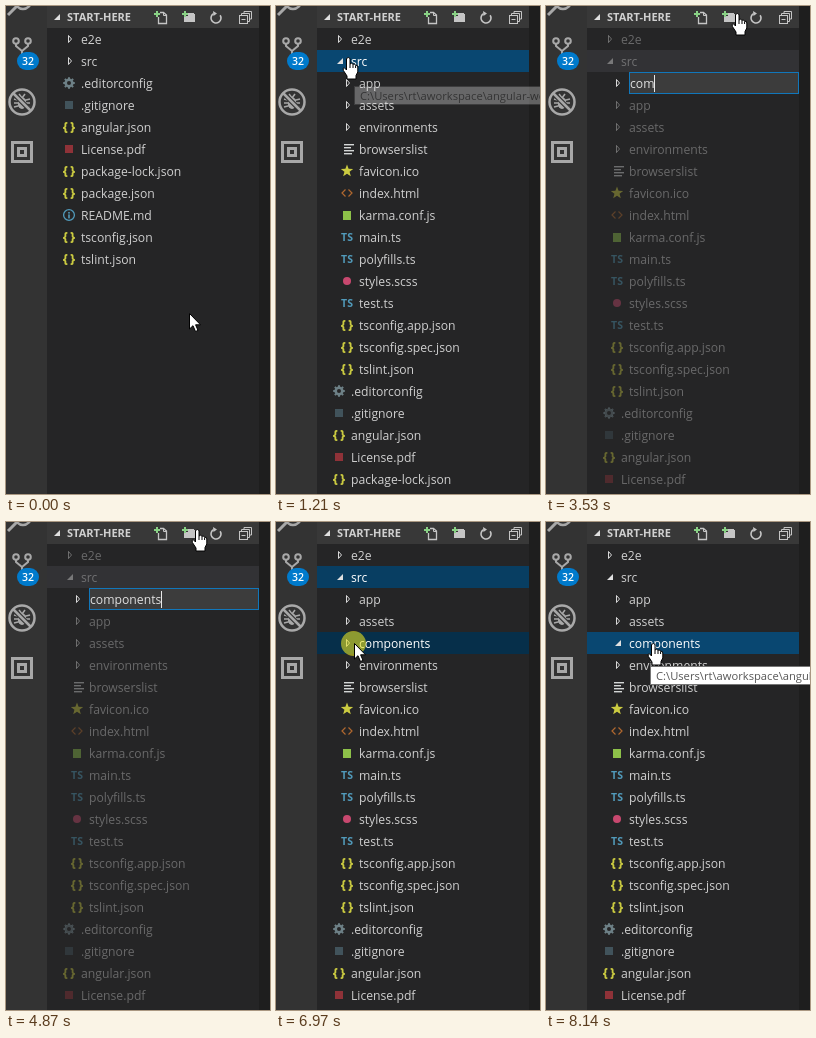
Recreate the animation shown at these times as an HTML page with a canvas. Size 264x488 px, loop 8210 ms.

```html
<!DOCTYPE html>
<html lang="en">
<head>
<meta charset="utf-8">
<title>Creating a folder in the file tree</title>
<style>
  html, body { margin: 0; width: 100%; height: 100%; overflow: hidden; background: #1e1e1e; }
  canvas { display: block; }
</style>
</head>
<body>
<canvas id="stage" width="264" height="488"></canvas>
<script>
const ctx = document.getElementById('stage').getContext('2d');
const LOOP = 8210;
const SANS = '"Open Sans", "Noto Sans", sans-serif';
const LABEL_FONT = '12.2px ' + SANS;
const TOOLTIP = 'C:\\Users\\rt\\aworkspace\\angular-workspace\\src';
const LEFT = 41, RIGHT = 253, ROW = 22;
const SELECTED = '#094771', SELECTED_DIM = '#083e62', FOCUSED = '#062f4a';

// name:icon
const parse = list => list.split(' ').map(s => s.split(':'));
const srcFiles = parse('app:dir assets:dir environments:dir browserslist:lines favicon.ico:star ' +
  'index.html:html karma.conf.js:green main.ts:ts polyfills.ts:ts styles.scss:pink test.ts:ts ' +
  'tsconfig.app.json:json tsconfig.spec.json:json tslint.json:json');
const rootFiles = parse('.editorconfig:gear .gitignore:slate angular.json:json License.pdf:red ' +
  'package-lock.json:json package.json:json README.md:info tsconfig.json:json tslint.json:json');

function path(points, close) {
  ctx.beginPath();
  for (let i = 0; i < points.length; i += 2) ctx.lineTo(points[i], points[i + 1]);
  if (close) ctx.closePath();
}
function line(points, color, width = 1) {
  path(points);
  ctx.strokeStyle = color;
  ctx.lineWidth = width;
  ctx.stroke();
}
function poly(points, color) {
  path(points, true);
  ctx.fillStyle = color;
  ctx.fill();
}
function box(x, y, w, h, color) {
  ctx.fillStyle = color;
  ctx.fillRect(x, y, w, h);
}
function frame(x, y, w, h, color, width = 1) {
  ctx.strokeStyle = color;
  ctx.lineWidth = width;
  ctx.strokeRect(x, y, w, h);
}
function disc(x, y, r, color) {
  ctx.beginPath();
  ctx.arc(x, y, r, 0, Math.PI * 2);
  ctx.fillStyle = color;
  ctx.fill();
}
function ring(x, y, r, color, width = 1, from = 0, to = Math.PI * 2) {
  ctx.beginPath();
  ctx.arc(x, y, r, from, to);
  ctx.strokeStyle = color;
  ctx.lineWidth = width;
  ctx.stroke();
}
function text(str, x, y, font, color, align = 'left') {
  ctx.font = font;
  ctx.fillStyle = color;
  ctx.textAlign = align;
  ctx.fillText(str, x, y);
}

function twistie(x, y, open) {
  if (open) poly([x + 3, y - 3, x + 3, y + 3, x - 3, y + 3], '#e0e0e0');
  else {
    path([x - 1.5, y - 3.5, x + 1.5, y, x - 1.5, y + 3.5], true);
    ctx.strokeStyle = '#d8d8d8';
    ctx.lineWidth = 1;
    ctx.stroke();
  }
}

const icons = {
  json: (x, y) => text('{\u2009}', x, y + 4, '800 11.5px ' + SANS, '#cbcb41', 'center'),
  ts: (x, y) => text('TS', x, y + 4, 'bold 10.5px ' + SANS, '#519aba', 'center'),
  lines(x, y) {
    [10, 7, 10, 8].forEach((w, i) => box(x - 3, y - 5 + i * 3, w, 1.4, '#d4d7d6'));
  },
  star(x, y) {
    const pts = [];
    for (let i = 0; i < 10; i++) {
      const r = i % 2 ? 2.7 : 6.5, a = i * Math.PI / 5;
      pts.push(x + r * Math.sin(a), y - r * Math.cos(a));
    }
    poly(pts, '#cbcb41');
  },
  html(x, y) {
    line([x - 1.5, y - 3.5, x - 5, y, x - 1.5, y + 3.5], '#b0682f', 1.2);
    line([x + 1.5, y - 3.5, x + 5, y, x + 1.5, y + 3.5], '#b0682f', 1.2);
  },
  gear(x, y) {
    ring(x, y, 3.3, '#6d8086', 2.6);
    for (let i = 0; i < 8; i++) {
      const c = Math.cos(i * Math.PI / 4), s = Math.sin(i * Math.PI / 4);
      line([x + 4 * c, y + 4 * s, x + 5.8 * c, y + 5.8 * s], '#6d8086', 2);
    }
  },
  info(x, y) {
    ring(x, y, 5.4, '#519aba', 1.3);
    box(x - 0.8, y - 3, 1.6, 1.6, '#519aba');
    box(x - 0.8, y - 0.6, 1.6, 4, '#519aba');
  },
  green: (x, y) => box(x - 4, y - 4, 8, 9, '#8dc149'),
  pink: (x, y) => disc(x, y, 4, '#c8486f'),
  slate: (x, y) => box(x - 4, y - 4, 8, 8, '#41535b'),
  red: (x, y) => box(x - 4, y - 4, 8, 8, '#8f3238')
};

function drawRow(index, row) {
  const top = ROW + index * ROW, mid = top + 11, shift = row.depth * 8;
  if (row.bg) box(LEFT, top, RIGHT - LEFT, ROW, row.bg);
  ctx.globalAlpha = row.dim ? 0.4 : 1;
  if (row.icon === 'dir') twistie(64 + shift, mid, row.open);
  else icons[row.icon](63 + shift, mid);
  const color = row.bg && !row.dim ? '#ffffff' : '#d0d0d0';
  if (row.name) text(row.name, 75 + shift, top + 16, LABEL_FONT, color);
  ctx.globalAlpha = 1;
}

function buildRows(t) {
  const editing = t >= 2370 && t < 5270;
  const opened = t >= 820, created = t >= 5340, picked = t >= 7120;
  const make = depth => ([name, icon]) => ({ name, icon, depth, dim: editing });
  const src = { ...make(0)(['src', 'dir']), open: opened };
  if (editing) src.bg = '#323235';
  else if (opened && !picked) src.bg = created ? SELECTED_DIM : SELECTED;
  const rows = [make(0)(['e2e', 'dir']), src];
  if (opened) {
    const inner = srcFiles.map(make(1));
    if (editing) inner.unshift({ name: '', icon: 'dir', depth: 1 });
    if (created) inner.splice(2, 0, {
      name: 'components', icon: 'dir', depth: 1, open: picked, bg: picked ? SELECTED : FOCUSED
    });
    rows.push(...inner);
  }
  return rows.concat(rootFiles.map(make(0)));
}

const keyTimes = [3070, 3460, 3530, 4020, 4170, 4400, 4550, 4640, 4720, 4870];
function drawInput(t) {
  if (t < 2370 || t >= 5270) return;
  box(83, 66, 170, 22, '#3c3c3c');
  frame(83.5, 66.5, 169, 21, '#1177bb');
  const typed = 'components'.slice(0, keyTimes.filter(k => t >= k).length);
  text(typed, 84, 82, LABEL_FONT, '#e0e0e0');
  const caretOff = (t >= 2830 && t < 3070) || (t >= 3930 && t < 4020);
  if (!caretOff) box(Math.round(84 + ctx.measureText(typed).width), 69, 1, 17, '#e8e8e8');
}

function plus(x, y) {
  box(x - 3, y - 1, 6, 2, '#89d185');
  box(x - 1, y - 3, 2, 6, '#89d185');
}
function drawHeader() {
  const c = '#c5c5c5';
  box(LEFT, 0, RIGHT - LEFT, ROW, '#383838');
  twistie(51, 11, true);
  text('START-HERE', 61, 15, 'bold 11px ' + SANS, '#d0d0d0');
  line([152.5, 11, 152.5, 17.5, 160.5, 17.5, 160.5, 9, 157.5, 6.5, 154, 6.5], c, 1.3);
  line([157.5, 6.5, 157.5, 9.5, 160.5, 9.5], c);
  plus(151, 8);
  poly([178, 10, 182, 10, 182, 7, 188, 7, 188, 8, 189, 8, 189, 16, 178, 16], c);
  plus(179, 8);
  ring(210, 12, 5, c, 1.6, -0.6, 4.2);
  poly([207, 5, 211, 7.5, 207.5, 10], c);
  line([238, 7, 238, 5.5, 245.5, 5.5, 245.5, 13, 244, 13], c);
  line([235.5, 9, 235.5, 7.5, 243.5, 7.5, 243.5, 15.5, 242, 15.5], c);
  frame(233.5, 9.5, 8, 8, c);
  line([235.5, 13.5, 239.5, 13.5], c);
}

function drawActivityBar(t) {
  const c = '#a8a8a8', bg = '#333333';
  box(0, 0, LEFT, 488, bg);
  line([2, 9, 11, 0], c, 3);
  ring(17, -5, 8, c, 2.5);
  // source control
  line([10, 36, 10, 40, 16, 45, 22, 40, 22, 36], c, 2);
  line([16, 44, 16, 52], c, 2);
  for (const x of [10, 22]) {
    disc(x, 35, 3.8, c);
    disc(x, 35, 1.8, bg);
  }
  ctx.beginPath();
  ctx.roundRect(11, 46, 22, 18, 9);
  ctx.fillStyle = '#007acc';
  ctx.fill();
  if (t < 7510 || t >= 7820) text('32', 22, 59, '600 10.5px ' + SANS, '#ffffff', 'center');
  // debug
  ctx.beginPath();
  ctx.ellipse(16, 97, 4.2, 6, 0, 0, Math.PI * 2);
  ctx.fillStyle = c;
  ctx.fill();
  for (const s of [-1, 1]) {
    for (const d of [-4, 0, 4]) line([16, 97 + d / 2, 16 + s * 8, 97 + d], c, 1.5);
    line([16, 92, 16 + s * 3, 88], c, 1.5);
  }
  line([7, 87, 25, 105], bg, 5);
  line([7, 87, 25, 105], c, 2.5);
  ring(16, 96, 12.5, c, 2.5);
  // extensions
  frame(6.5, 136.5, 19, 19, c, 3);
  frame(12.5, 142.5, 7, 7, c, 3);
}

const smooth = p => p * p * (3 - 2 * p);
// start, end, steps, x, y
const moves = [
  [70, 590, 8, 81, 55], [1120, 1200, 2, 72, 51], [1280, 1360, 2, 66, 50],
  [1530, 1910, 6, 191, 7], [6200, 6660, 7, 82, 121], [7270, 7510, 4, 107, 121]
];
function pointerAt(t) {
  let x = 183, y = 307;
  for (const [start, end, steps, toX, toY] of moves) {
    if (t < start) break;
    const step = Math.floor((t - start) / (end - start) * (steps - 1) + 1e-6) + 1;
    const p = smooth(Math.min(step / steps, 1));
    x += (toX - x) * p;
    y += (toY - y) * p;
  }
  return [Math.round(x), Math.round(y)];
}

const arrow = new Path2D('M.5 .5V16L4 12.7L6.5 18.5L9 17.4L6.6 11.8H11.5Z');
const hand = new Path2D('M-1.5 1.5Q.5 -.5 2 1.5V7Q3.5 5.3 5 7.3Q6.7 6.2 7.6 8.3Q9.8 7.6 9.8 10V15' +
  'L8 18.5V22H-1V19L-4.6 13.5Q-5.6 10.5 -3.6 10.8L-1.5 13Z');
const fingers = new Path2D('M2 7V11M5 7.5V11M7.6 8.5V11');

function drawPointer(t) {
  let [x, y] = pointerAt(t);
  const pressed = t >= 6970 && t < 7120;
  const isArrow = y > 264 || pressed;
  if (pressed) x = 78;
  ctx.save();
  ctx.translate(x, y);
  ctx.fillStyle = '#ffffff';
  ctx.strokeStyle = '#000000';
  ctx.lineWidth = 1;
  ctx.fill(isArrow ? arrow : hand);
  ctx.stroke(isArrow ? arrow : hand);
  if (!isArrow) ctx.stroke(fingers);
  ctx.restore();
}

// start, end, x, y
const clicks = [[670, 820, 81, 55], [2140, 2290, 188.5, 8.5], [6810, 7120, 77.5, 121.5]];
function drawClick(t) {
  for (const [start, end, x, y] of clicks) {
    if (t >= start && t < end) disc(x, y, 12.5, 'rgba(232, 226, 34, 0.6)');
  }
}

// The tooltip fades as one layer, so it is painted once on its own canvas.
const tip = document.createElement('canvas');
tip.width = 300;
tip.height = 19;
function paintTip() {
  const c = tip.getContext('2d');
  c.fillStyle = '#ffffff';
  c.fillRect(0, 0, 300, 19);
  c.strokeStyle = '#767676';
  c.strokeRect(0.5, 0.5, 299, 18);
  c.font = '11.2px ' + SANS;
  c.fillStyle = '#575757';
  c.fillText(TOOLTIP, 6, 13.5);
}

// start, alpha
const firstTip = [[890, 0.35], [970, 0.7], [1040, 1], [1210, 0.3], [1280, 0.12], [1360, 0]];
const lastTip = [[7990, 0.35], [8070, 0.7], [8140, 1]];
function drawTooltip(t, x, y, fades) {
  const passed = fades.filter(f => t >= f[0]);
  if (!passed.length) return;
  ctx.globalAlpha = passed[passed.length - 1][1];
  ctx.drawImage(tip, x, y);
  ctx.globalAlpha = 1;
}

function draw(t) {
  box(0, 0, 264, 488, '#1e1e1e');
  box(LEFT, 0, RIGHT - LEFT, 488, '#252526');
  buildRows(t).slice(0, 21).forEach((row, i) => drawRow(i, row));
  drawInput(t);
  drawHeader();
  drawActivityBar(t);
  drawTooltip(t, 78, 80, firstTip);
  drawTooltip(t, 104, 144, lastTip);
  drawClick(t);
  drawPointer(t);
}

const begin = performance.now();
function tick() {
  draw((performance.now() - begin) % LOOP);
  requestAnimationFrame(tick);
}
paintTip();
tick();
</script>
</body>
</html>
```
